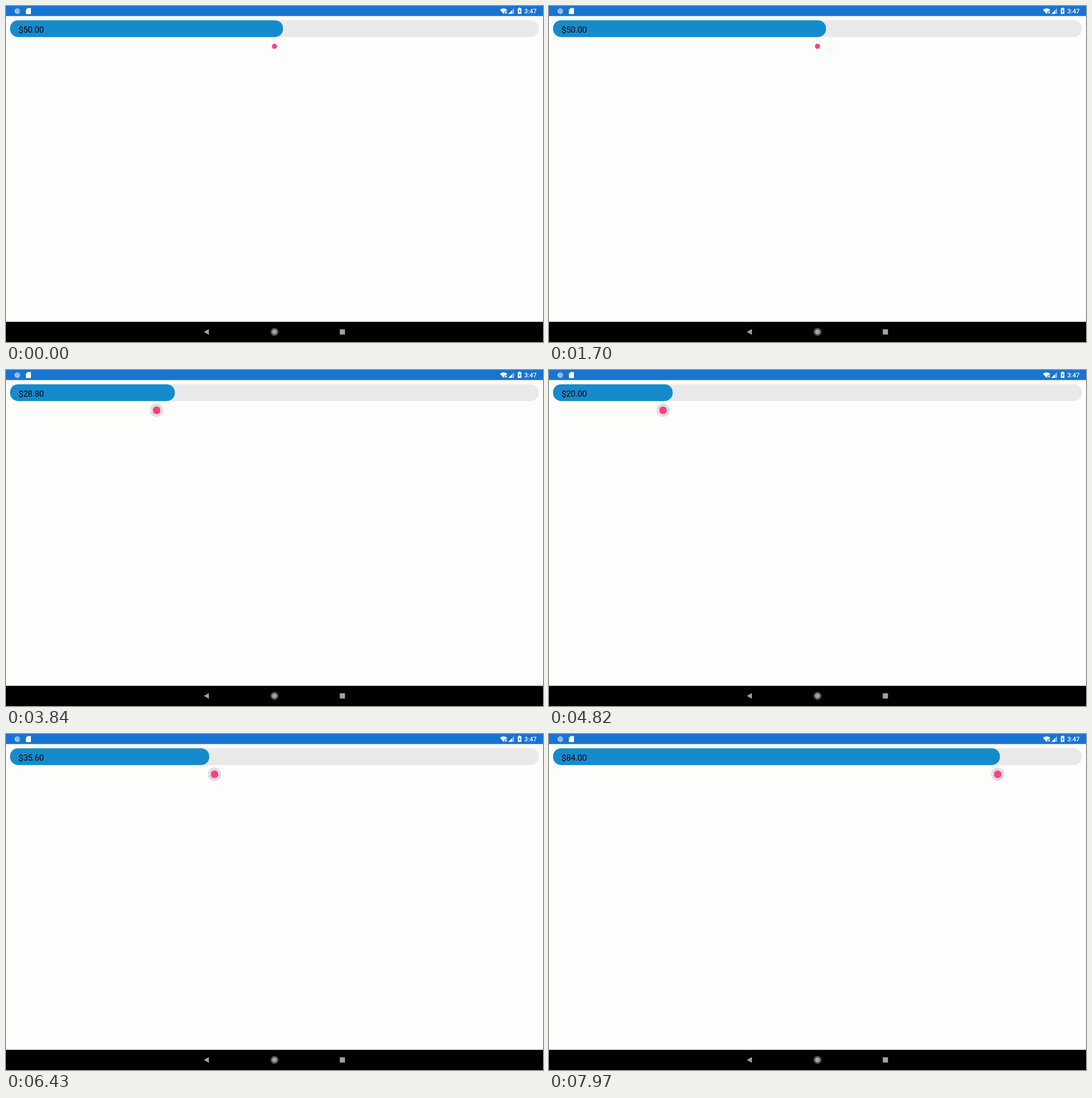
An HTML page for the animation above (8000 ms loop, 947 by 592 pixels).

```html
<!DOCTYPE html>
<html lang="en">
<head>
<meta charset="utf-8">
<title>Amount slider</title>
<style>
  html, body { margin: 0; width: 100%; height: 100%; overflow: hidden; background: #fdfdfc; }
  svg { display: block; width: 100%; height: 100%; }
  text { font-family: Roboto, sans-serif; }
  #amount { font-size: 15px; letter-spacing: -.25px; }
</style>
</head>
<body>
<svg viewBox="0 0 947 592">
  <rect width="947" height="592" fill="#fdfdfc"/>

  <!-- status bar -->
  <rect width="947" height="17.7" fill="#1774d2"/>
  <circle cx="20" cy="9" r="5" fill="#8ab9e8"/>
  <path d="M16.5 6.5A4.6 4.6 0 0 0 23 12.3" fill="none" stroke="#b5d3f0" stroke-width="1.2"/>
  <path d="M38 3.6H43a1 1 0 0 1 1 1V13.2a1 1 0 0 1-1 1H36a1 1 0 0 1-1-1V6.8Z" fill="#fff"/>
  <path d="M871 6.6Q877.5 1.8 884 6.6L881.8 9.3H879V12.5L877.5 14Z" fill="#fff"/>
  <path d="M880.3 10l3 3m0-3l-3 3" stroke="#fff" stroke-width="1.1"/>
  <path d="M896 3.7V14H885.8Z" fill="#8ab9e8"/>
  <path d="M892 7.8V14H885.8Z" fill="#fff"/>
  <path d="M904.4 2.8h2.6v1.1h1.8V14h-6.2V3.9h1.8Z" fill="#fff"/>
  <path d="M906.3 5.5L904.1 9.4h1.3v3l2.2-4h-1.3Z" fill="#1774d2"/>
  <text x="914" y="12.8" font-size="11" font-weight="500" fill="#fff">3:47</text>

  <!-- amount bar -->
  <rect x="7.2" y="25.2" width="932.6" height="29.5" rx="14.75" fill="#e9e9e9"/>
  <rect id="bar" x="7.2" y="25.2" height="29.5" rx="14" fill="#158bcd"/>
  <text id="amount" x="22" y="47.2"></text>

  <!-- slider -->
  <g id="thumb">
    <circle id="halo" fill="#dedede"/>
    <path id="tick" d="M-12 0H-6" stroke="#fdfdfc" stroke-width="1.2"/>
    <circle id="dot" fill="#ff4081"/>
  </g>

  <!-- navigation bar -->
  <rect y="556.5" width="947" height="35.5" fill="#000"/>
  <g fill="#a2a2a2">
    <path d="M349 574.2L357.8 569.2V579.2Z"/>
    <circle cx="473.5" cy="574.2" r="4.8"/>
    <circle cx="473.5" cy="574.2" r="6.2" fill="none" stroke="#a2a2a2"/>
    <rect x="588.6" y="569.6" width="9.2" height="9.2"/>
  </g>
</svg>
<script>
const LOOP = 8000, PRESS = 2955, LAG = 95;
const el = id => document.getElementById(id);
const bar = el('bar'), amount = el('amount'), thumb = el('thumb');
const halo = el('halo'), tick = el('tick'), dot = el('dot');

// Turning points of the drag: time in ms, slider value.
const drag = [
  [PRESS, 50], [3750, 28.73], [4240, 20], [4820, 20], [5880, 33.3], [6310, 34.8],
  [7090, 57.7], [7190, 57.7], [7875, 84], [7970, 85]
];

const clamp = x => Math.max(0, Math.min(1, x));

function valueAt(t) {
  let [from, value] = drag[0];
  for (const [to, next] of drag.slice(1)) {
    value += (next - value) * clamp((t - from) / (to - from));
    from = to;
  }
  return value;
}

function draw(t) {
  const value = valueAt(t - LAG); // the bar trails the thumb
  const press = clamp((t - PRESS) / 150);
  bar.setAttribute('width', 30.5 + 9.016 * value);
  amount.textContent = '$' + value.toFixed(1) + '0';
  thumb.setAttribute('transform', `translate(${19.4 + 9.08 * valueAt(t)} 71)`);
  halo.setAttribute('r', 11.8 * press);
  tick.setAttribute('opacity', press);
  dot.setAttribute('r', 4.5 + 2.2 * press);
}

const began = performance.now();
function frame() {
  draw((performance.now() - began) % LOOP);
  requestAnimationFrame(frame);
}
frame();
</script>
</body>
</html>
```
